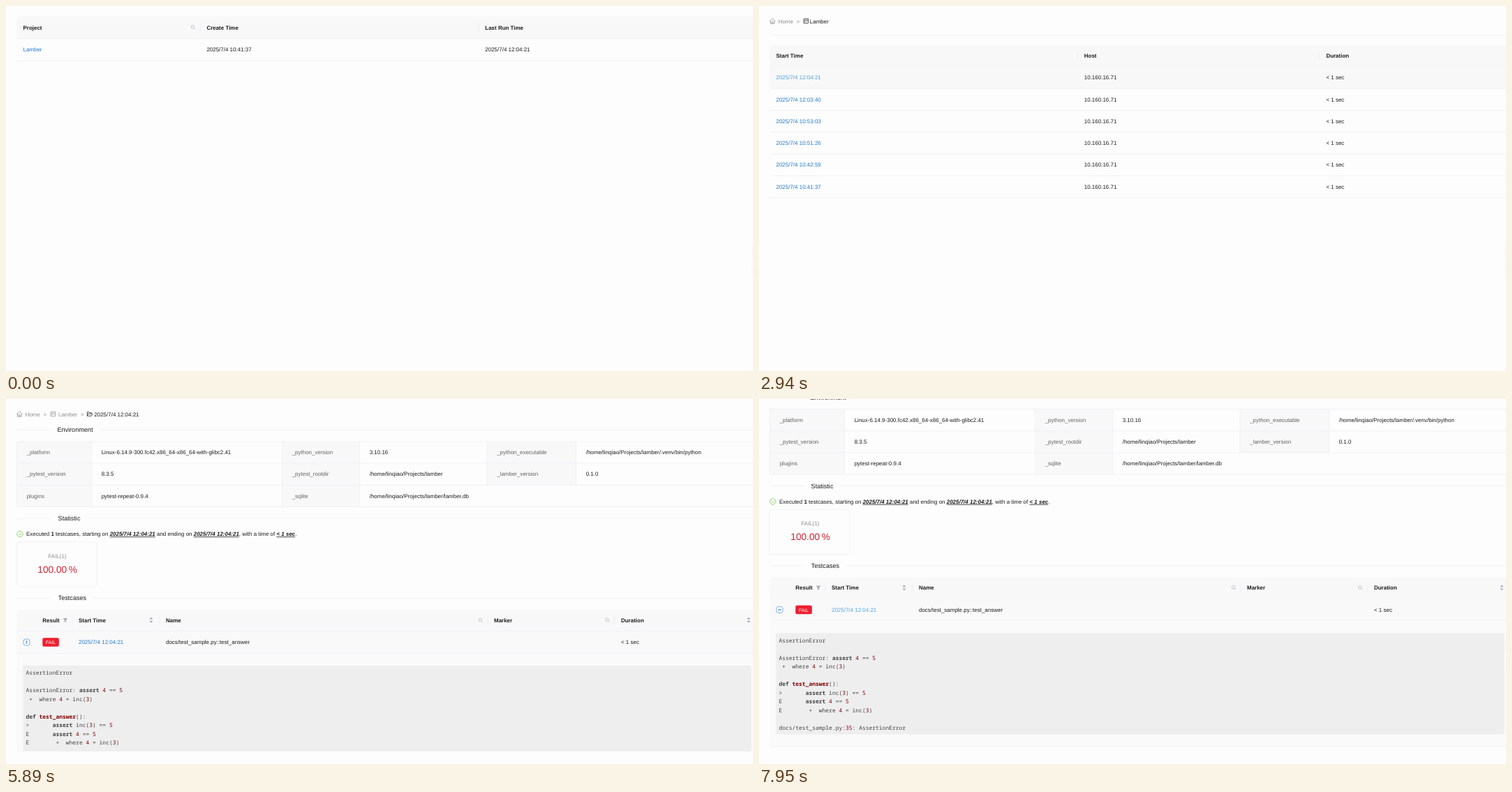
Animation of 1070x523 px, one loop 8 s. Source, as an HTML page:

```html
<!DOCTYPE html>
<html lang="en">
<head>
<meta charset="utf-8">
<title>Test report walkthrough</title>
<style>
html, body { margin: 0; width: 100%; height: 100%; overflow: hidden; background: #fdfdfd; }
svg { display: block; width: 100%; height: 100%; }
text { font: 7.97px "Liberation Sans", Arial, sans-serif; fill: #1c1c1c; white-space: pre; text-rendering: geometricPrecision; }
.b { font-weight: 700; }
.em { font-weight: 700; font-style: italic; text-decoration: underline; }
.dim { fill: #8e8e8e; }
.label { fill: #626262; }
.link { fill: #2079c9; }
.h { font-size: 9.1px; }
.big { font-size: 13.66px; fill: #cb2233; }
.tag { font-size: 6.83px; fill: #fff; }
.code { font-family: "Noto Sans Mono", monospace; fill: #444; }
.num { fill: #800000; }
.url { font: 8.35px Inter, sans-serif; fill: #3a3a3a; }
.line { stroke: #ececf2; stroke-width: .7; fill: none; }
.head { fill: #f8f8f9; }
.ico { fill: none; stroke-width: .75; stroke-linejoin: round; }
</style>
</head>
<body>
<svg id="stage" viewBox="0 0 1070 523" preserveAspectRatio="none"></svg>
<script>
const LOOP = 8000, LEFT = 15.5, RIGHT = 1072, ROW = 31.27;
const DARK = '#1c1c1c', DIM = '#8e8e8e';
const LINK = [32, 121, 201], LINK_HOVER = [82, 166, 224];
const INK = [28, 28, 28], ICON_BLUE = [74, 150, 220], ICON_EDGE = [243, 243, 246];
const DATE = '2025/7/4 12:04:21';
const ROOT = '/home/linqiao/Projects/lamber';

// Drawing helpers; text is placed by the middle of its capitals.
const esc = s => s.replace(/&/g, '&amp;').replace(/</g, '&lt;').replace(/>/g, '&gt;');
const text = (x, mid, s, cls = '', id = '') =>
  `<text x="${x}" y="${mid + 2.85}" class="${cls}" id="${id}">${esc(s)}</text>`;
const rect = (x, y, w, h, attrs = '') => `<rect x="${x}" y="${y}" width="${w}" height="${h}" ${attrs}/>`;
const path = (d, attrs = 'class="line"') => `<path d="${d}" ${attrs}/>`;
const hline = (y, x1 = LEFT, x2 = RIGHT) => path(`M${x1} ${y}H${x2}`);
const vline = (x, y1, y2) => path(`M${x} ${y1}V${y2}`);
const at = (x, y, s) => `<g transform="translate(${x} ${y})">${s}</g>`;

const stroke = color => `class="ico" stroke="${color}"`;
const search = (x, y) => at(x, y,
  `<circle cx="-.6" cy="-.6" r="2.2" ${stroke('#b4b4b8')}/>` + path('M1 1L3.1 3.1', stroke('#b4b4b8')));
const sorter = (x, y) => at(x, y, path('M-2.5 -1.1L0 -4L2.5 -1.1ZM-2.5 1.1L0 4L2.5 1.1Z', 'fill="#a9a9b0"'));
const filter = (x, y) => at(x, y, path('M-3.2 -2.8H3.2L1.1 .4V3H-1.1V.4Z', 'fill="#b0b0b4"'));
const home = (x, y) => at(x, y,
  path('M-4 .4L0 -3.7L4 .4M-2.9 -.6V3.7H2.9V-.6M-.9 3.7V1.2H.9V3.7', stroke(DIM)));
const board = (x, y, c) => at(x, y, rect(-3.2, -3.2, 6.4, 6.4, `rx=".4" ${stroke(c)}`) +
  path('M-1.5 -1.8V1.8M0 -1.8V-.2M1.6 -1.8V.5', stroke(c)));
const folder = (x, y) => at(x, y,
  path('M-3.4 2.8V-2.8H-.9L.1 -1.7H2.6V-.4M-3.4 2.8L-2.2 -.4H3.9L2.7 2.8Z', stroke(DARK)));
const check = (x, y) => at(x, y, `<circle r="4.2" ${stroke('#6cc644')}/>` +
  path('M-1.9 0L-.4 1.6L2 -1.6', stroke('#6cc644')));

const tableHead = (y, h, seps) =>
  path(`M${RIGHT} ${y}H${LEFT + 4.5}q-4.5 0 -4.5 4.5V${y + h}H${RIGHT}Z`, 'class="head"') +
  seps.map(x => vline(x, y + h / 2 - 6.2, y + h / 2 + 6.2)).join('') + hline(y + h);
const hoverRow = (id, y, h) => rect(LEFT, y, RIGHT - LEFT, h, `id="${id}" fill="#f8f8f9"`);
const title = (x, y, s, end) =>
  hline(y + .3, LEFT, 65.5) + text(x, y + .4, s, 'h') + hline(y + .3, end);
const crumbs = () => home(19.3, 21.5) + text(27.7, 21.7, 'Home', 'dim') + text(53.6, 21.7, '>', 'dim');

function homePage() {
  return tableHead(15.3, 31.2, [278.4, 677.3]) + hoverRow('hover1', 46.8, 31.6) +
    text(24.5, 30.7, 'Project', 'b') + search(267.9, 30.5) +
    text(287.4, 30.7, 'Create Time', 'b') + text(686.3, 30.7, 'Last Run Time', 'b') +
    text(24.5, 62, 'Lamber', 'link', 'link1') +
    text(287.4, 62, '2025/7/4 10:41:37') + text(686.3, 62, DATE) + hline(78.6);
}

function projectPage() {
  const runs = ['12:04:21', '12:03:40', '10:53:03', '10:51:26', '10:42:59', '10:41:37'];
  const rows = runs.map((run, i) => {
    const y = 102.4 + ROW * i;
    return text(24.5, y, '2025/7/4 ' + run, 'link', i ? '' : 'link2') +
      text(465.8, y, '10.160.16.71') + text(812.4, y, '< 1 sec') + hline(y + 15.9);
  });
  return crumbs() + board(67.3, 21.5, DARK) + text(72.8, 21.7, 'Lamber') + hline(41.8) +
    tableHead(56, 31, [456.7, 803.3]) + hoverRow('hover2', 87.2, 31) +
    text(24.5, 71.2, 'Start Time', 'b') + text(465.8, 71.2, 'Host', 'b') +
    text(812.4, 71.2, 'Duration', 'b') + rows.join('');
}

function environment() {
  const cols = [LEFT, 122.5, 395.5, 506.5, 689, 816.5, RIGHT];
  const top = 61, rowY = i => top + 31.2 * i;
  const cells = [
    ['_platform', 'Linux-6.14.9-300.fc42.x86_64-x86_64-with-glibc2.41', '_python_version', '3.10.16',
      '_python_executable', ROOT + '/.venv/bin/python'],
    ['_pytest_version', '8.3.5', '_pytest_rootdir', ROOT, '_lamber_version', '0.1.0'],
    ['plugins', 'pytest-repeat-0.9.4', '_sqlite', ROOT + '/lamber.db']
  ];
  let fills = '', lines = '', words = '';
  cells.forEach((row, r) => row.forEach((s, c) => {
    if (c % 2 === 0) fills += rect(cols[c], rowY(r), cols[c + 1] - cols[c], 31.2, 'class="head"');
    lines += vline(cols[c], rowY(r), rowY(r + 1));
    words += text(cols[c] + 14.2, rowY(r) + 15.4, s, c % 2 ? '' : 'label');
  }));
  for (let i = 0; i < 4; i++) lines += hline(rowY(i));
  return fills + lines + words;
}

function statistic() {
  const em = s => `<tspan class="em">${esc(s)}</tspan>`;
  return check(19.9, 193.4) +
    `<text x="29" y="196.3">Executed <tspan class="b">1</tspan> testcases, starting on ${em(DATE)}` +
    ` and ending on ${em(DATE)}, with a time of ${em('< 1 sec')}.</text>` +
    rect(14.8, 204.8, 115.2, 64.2, 'rx="4.5" class="line"') +
    text(60.4, 224.7, 'FAIL(1)', 'dim') + text(45.3, 246, '100.00', 'big') + text(89.8, 246, '%', 'big');
}

function testcases() {
  const y = 316.8, rowY = 348.6;
  return tableHead(302, 30.6, [95, 220, 690, 872]) + hoverRow('hover3', 333, 31.2) +
    text(52.3, y, 'Result', 'b') + filter(85, y) + text(104, y, 'Start Time', 'b') + sorter(207.9, y) +
    text(229, y, 'Name', 'b') + search(680, y) + text(699, y, 'Marker', 'b') + search(861.4, y) +
    text(881, y, 'Duration', 'b') + sorter(1063.9, y) +
    at(29.5, 348.5, rect(-4.5, -4.5, 9, 9, 'id="box" rx="3" fill="#fefefe" stroke-width=".7"') +
      path('M-2.5 0H2.5', 'id="barH" stroke-width=".8"') + path('M0 -2.5V2.5', 'id="barV" stroke-width=".8"')) +
    rect(52.3, 342.2, 23.6, 12.6, 'rx="2.3" fill="#ee1f30"') + text(56.9, 348.3, 'FAIL', 'tag') +
    text(104, rowY, DATE, 'link', 'link3') + text(229, rowY, 'docs/test_sample.py::test_answer') +
    text(881, rowY, '< 1 sec') + hline(364.6);
}

function traceback() {
  const lines = [
    'AssertionError', '', 'AssertionError: assert 4 == 5', ' +  where 4 = inc(3)', '',
    'def test_answer():', '>       assert inc(3) == 5', 'E       assert 4 == 5',
    'E        +  where 4 = inc(3)', '', 'docs/test_sample.py:35: AssertionError'
  ];
  const paint = s => esc(s).replace(/\b(assert|def|test_answer|\d+)\b/g, w => {
    const cls = /\d/.test(w) ? 'num' : w === 'test_answer' ? 'b num' : 'b';
    return `<tspan class="${cls}">${w}</tspan>`;
  });
  return rect(LEFT, 364.9, RIGHT - LEFT, 179.6, 'fill="#fafafb"') + hline(544.5) +
    rect(24.5, 382, 1043, 145, 'rx="1" fill="#eeeeee"') +
    lines.map((s, i) => `<text class="code" x="28.4" y="${395.4 + 12.48 * i}">${paint(s)}</text>`).join('');
}

function reportPage() {
  return `<g clip-path="url(#view)"><g id="scroll">` +
    crumbs() + board(67.3, 21.5, DIM) + text(75, 21.7, 'Lamber', 'dim') + text(106.9, 21.7, '>', 'dim') +
    folder(119.8, 21.5) + text(126.3, 21.7, DATE) +
    title(73.4, 44, 'Environment', 134) + environment() +
    title(74.6, 170.8, 'Statistic', 116) + statistic() +
    title(74.7, 285.2, 'Testcases', 125) + testcases() +
    `<g id="trace">${traceback()}</g></g></g>`;
}

document.getElementById('stage').innerHTML =
  `<clipPath id="view">${rect(0, 0, 1070, 505)}</clipPath>` +
  rect(0, 0, 1070, 523, 'fill="#fdfdfd"') +
  `<g id="page1">${homePage()}</g><g id="page2">${projectPage()}</g><g id="page3">${reportPage()}</g>` +
  rect(1068.6, 345, 2, 18, 'fill="#f5f5fa"') + rect(1067.5, 374, 3, 13, 'fill="#f9f9fc"') +
  `<g id="status">${rect(-2, 512.3, 296.5, 14, 'id="statusBox" rx="2" fill="#fdfdfd" stroke="#d4d4da" stroke-width=".7"')}` +
  `<text id="url" class="url" x="1.4" y="521.4"></text></g>`;

const el = {};
document.querySelectorAll('[id]').forEach(n => { if (n.id) el[n.id] = n; });

// Timing helpers
const ramp = (t, from, to) => Math.min(1, Math.max(0, (t - from) / (to - from)));
const smooth = p => p * p * (3 - 2 * p);
const easeOut = p => 1 - (1 - p) ** 2;
const mix = (a, b, p) => `rgb(${a.map((v, i) => Math.round(v + (b[i] - v) * p))})`;
const show = (node, on) => { node.style.display = on ? '' : 'none'; };

const query = '?projectId=67720270&projectName=Lamber';
const hovers = [
  { from: 1180, to: 1710, page: 'project' },
  { from: 3060, to: 3710, page: 'record' },
  { from: 5120, to: 5530, page: 'testcase' }
];

function setStatus(t) {
  const hover = hovers.find(h => t >= h.from && t < h.to + 100);
  show(el.status, hover);
  if (!hover) return;
  const url = `http://localhost:8000/${hover.page}${query}`;
  if (el.url.textContent !== url) {
    el.url.textContent = url;
    el.statusBox.setAttribute('width', el.url.getComputedTextLength() + 6);
  }
  el.status.setAttribute('opacity', ramp(t, hover.from, hover.from + 100) * (1 - ramp(t, hover.to, hover.to + 100)));
}

function setLink(node, p) { node.style.fill = mix(LINK, LINK_HOVER, smooth(p)); }

function render(t) {
  show(el.page1, t < 1710);
  show(el.page2, t >= 1710 && t < 3710);
  show(el.page3, t >= 3710);
  setStatus(t);

  el.hover1.setAttribute('opacity', ramp(t, 920, 1120));
  el.hover2.setAttribute('opacity', ramp(t, 2630, 2830));
  el.hover3.setAttribute('opacity', .7 * ramp(t, 4810, 5010));
  setLink(el.link1, ramp(t, 1080, 1380));
  setLink(el.link2, ramp(t, 2700, 3000));
  setLink(el.link3, ramp(t, 4940, 5240) - ramp(t, 5510, 5780) + ramp(t, 7650, 7930));

  const blue = ramp(t, 5600, 5780), turn = easeOut(ramp(t, 5800, 6110));
  el.box.setAttribute('stroke', mix(ICON_EDGE, ICON_BLUE, blue));
  for (const bar of [el.barH, el.barV]) bar.setAttribute('stroke', mix(INK, ICON_BLUE, blue));
  el.barH.setAttribute('transform', `rotate(${-180 + 180 * turn})`);
  el.barV.setAttribute('transform', `rotate(${90 * turn})`);
  show(el.trace, t >= 5810);

  // The wheel scroll advances in 60 ms ticks.
  const tick = 7180 + Math.floor((t - 7180) / 60) * 60;
  const scroll = t < 7180 ? 0 : 46.5 * smooth(ramp(tick, 7140, 7430));
  el.scroll.setAttribute('transform', `translate(0 ${-scroll})`);
}

const start = performance.now();
function loop() {
  render((performance.now() - start) % LOOP);
  requestAnimationFrame(loop);
}
loop();
</script>
</body>
</html>
```
